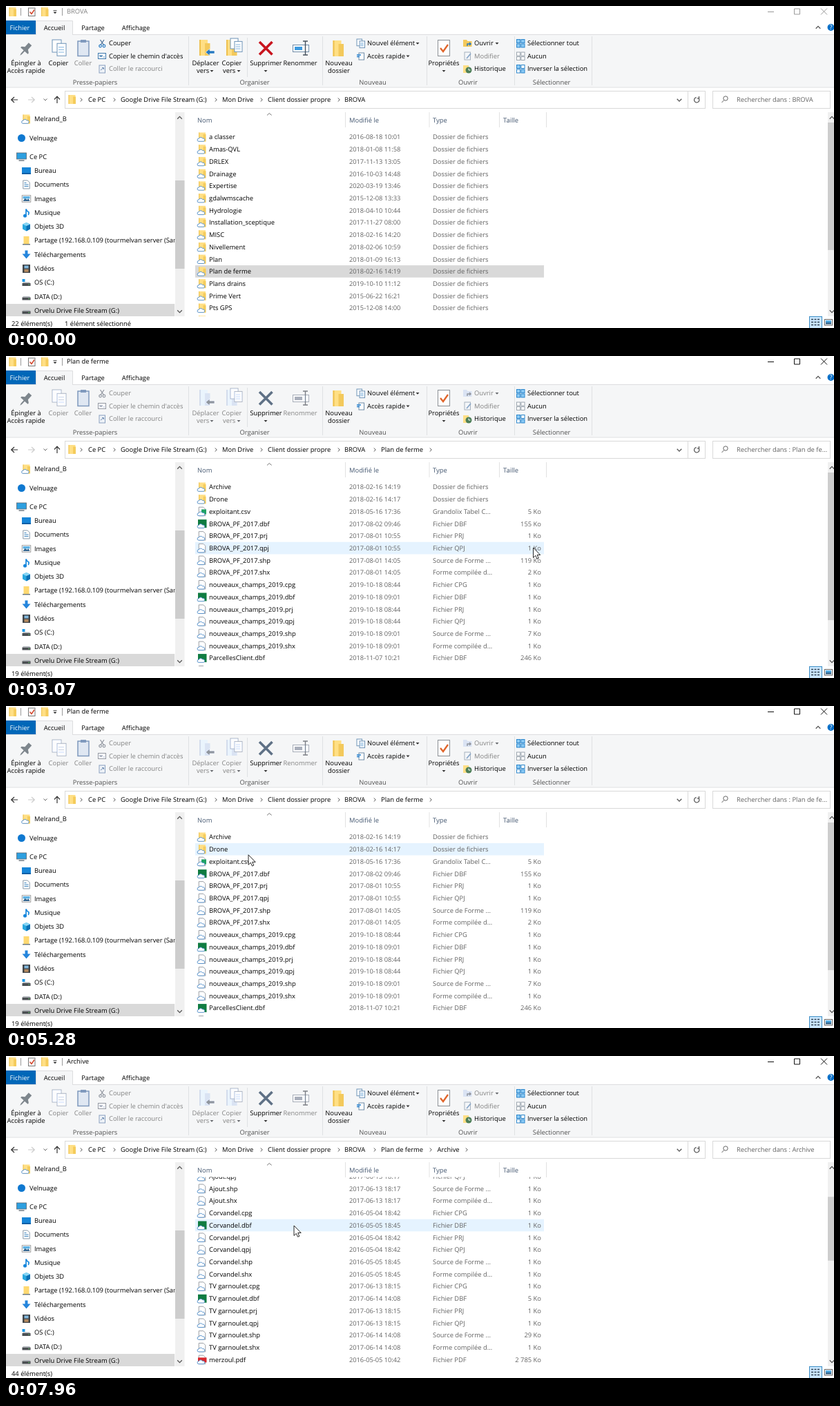
Animation of 1199x467 px, one loop 8 s. Source, as an HTML page:

```html
<!DOCTYPE html>
<html lang="fr">
<head>
<meta charset="utf-8">
<title>Explorateur</title>
<style>
html, body { margin: 0; width: 100%; height: 100%; overflow: hidden; background: #fff; }
svg { display: block; width: 100%; height: 100%; }
text { font: 9.4px "Open Sans", "Noto Sans", sans-serif; fill: #000; text-rendering: geometricPrecision; white-space: pre; }
.m { text-anchor: middle; }
.e { text-anchor: end; }
.off { fill: #838383; }
.soft { fill: #626262; }
.date { font-size: 9.25px; }
.group { fill: #505050; }
.head { fill: #43566f; }
.inv { fill: #fff; }
.dim .on { fill: #838383; }
.dim .ico { filter: grayscale(1) sepia(.4) hue-rotate(180deg) opacity(.75); }
.cross { stroke: #c8141e; }
.dim .cross { stroke: #5f7186; }
.win { stroke: #111; }
.blur .win { stroke: #999; }
.blur #title { fill: #808080; }
</style>
</head>
<body>
<script>
const W = 1199, H = 467, ROW = 17.72, TOP = 181.14, LOOP = 8000;

const text = (x, y, s, c = "", id = "") =>
  `<text x="${x}" y="${y + 3.4}" class="${c}" ${id && `id="${id}"`}>${s}</text>`;
const rect = (x, y, w, h, fill, more = "") =>
  `<rect x="${x}" y="${y}" width="${w}" height="${h}" fill="${fill}" ${more}/>`;
const line = (d, stroke = "#555", w = 1, more = "") =>
  `<path d="${d}" fill="none" stroke="${stroke}" stroke-width="${w}" ${more}/>`;
const fill = (d, color, more = "") => `<path d="${d}" fill="${color}" ${more}/>`;
const disc = (x, y, r, color) => `<circle cx="${x}" cy="${y}" r="${r}" fill="${color}"/>`;
const group = (s, more = "") => `<g ${more}>${s}</g>`;
const use = (id, x, y) => `<use href="#${id}" x="${x}" y="${y}"/>`;
const ico = s => group(s, 'class="ico"');
const drop = (x, y, color = "#333") => fill(`M${x - 2.5} ${y - 1}h5l-2.5 2.8z`, color);
const next = x => line(`M${x - 1.3} 133.5l2.6 2.5l-2.6 2.5`);
const up = (x, y) => line(`M${x - 3.3} ${y + 1.7}l3.3 -3.3l3.3 3.3`, "#555", 1.3);
const down = (x, y) => line(`M${x - 3.3} ${y - 1.7}l3.3 3.3l3.3 -3.3`, "#555", 1.3);

// Icons are centred on 0,0
const page = (w, h, edge = "#8f959b") =>
  fill(`M${-w / 2} ${-h / 2}h${w - 3}l3 3v${h - 3}h${-w}z`, "#fff", `stroke="${edge}" stroke-width=".9"`);
const cloud = fill("M-5 6.3a2 2 0 0 1 .2-4a3 3 0 0 1 5.4-.3a2.2 2.2 0 0 1 1.6 4.3z", "#fff", 'stroke="#4a8ac8" stroke-width=".9"');
const folder = rect(-5, -6.5, 10, 13, "#ffdf85") + rect(1.5, -4, 4, 10.5, "#f5cc5c") + rect(-5, -6.5, 1.2, 13, "#f0c75a");
const icons = {
  folder, dir: folder + cloud,
  file: page(9.5, 12.5) + cloud,
  sheet: rect(-6, -6, 12.5, 12, "#107c41") + cloud,
  csv: page(9.5, 12.5) + rect(-1, -3, 7, 7, "#21a366") + cloud,
  pdf: page(9.5, 12.5) + rect(-6, -3, 12.5, 7, "#d9262c") + cloud,
  pc: rect(-7, -5.5, 14, 9, "#2d9fe0", 'stroke="#5c6670" stroke-width=".8"') + rect(-4, 5, 8, 1.3, "#5c6670"),
  desk: rect(-6.5, -5, 13, 10, "#1685d8") + rect(-6.5, 3, 13, 2, "#0a5ea5"),
  doc: page(9.5, 12, "#7d8fa0") + line("M-3 -2.5h3M-3 0h6M-3 2.5h6", "#3d84bd", 1.2),
  pic: rect(-6.3, -4.8, 12.6, 9.6, "#fff", 'stroke="#888" stroke-width=".8"') + rect(-5, -3.5, 10, 3.5, "#5fb3e6") + fill("M-5 3.5l3-4l3 2l2-1.5l2 3.5z", "#35658e"),
  note: line("M-.5 4.5v-10q1 3 4 4.5q.6 2-.8 4", "#1787dc", 1.7) + disc(-2, 4.3, 2.5, "#1787dc"),
  cube: fill("M-5.5 -3.5L0 -6L5.5 -3.5V3.5L0 6.5L-5.5 3.5z", "#29a8e0") + fill("M0 -1L5.5 -3.5V3.5L0 6.5z", "#0b6fb4") + fill("M-5.5 -3.5L0 -6L5.5 -3.5L0 -1z", "#8ad6f5"),
  share: rect(-4, -6, 8, 11, "#ffd970") + rect(-5.5, 5, 11, 1.5, "#6d7a80"),
  get: fill("M-2 -6h4v5h4L0 6L-6 -1h4z", "#2585dc"),
  film: rect(-5.5, -6, 11, 12, "#3f4347") + rect(-3, -4.5, 6, 4, "#82b8dd") + rect(-3, .8, 6, 4, "#b4895e"),
  disk: rect(-6, 1, 12, 4, "#4b4f53") + rect(-5, -.5, 10, 1.5, "#aeb4b9") + rect(3, 2.5, 1.5, 1, "#61d66b"),
};
icons.system = icons.disk + rect(-6, -5, 4, 4, "#1d9ae8");

const kinds = { csv: "Grandolix Tabel C...", shp: "Source de Forme ...", shx: "Forme compilée d..." };
const looks = { csv: "csv", dbf: "sheet", pdf: "pdf" };

const places = [
  { title: "BROVA", find: "BROVA", count: 22, rows: `a classer|2016-08-18 10:01
Amas-QVL|2018-01-08 11:58
DRLEX|2017-11-13 13:05
Drainage|2016-10-03 14:48
Expertise|2020-03-19 13:46
gdalwmscache|2015-12-08 13:33
Hydrologie|2018-04-10 10:44
Installation_sceptique|2017-11-27 08:00
MISC|2018-02-16 14:20
Nivellement|2018-02-06 10:59
Plan|2018-01-09 16:13
Plan de ferme|2018-02-16 14:19
Plans drains|2019-10-10 11:12
Prime Vert|2015-06-22 16:21
Pts GPS|2015-12-08 14:00
Rapports|2016-05-11 09:30` },
  { title: "Plan de ferme", find: "Plan de fe...", count: 19, rows: `Archive|2018-02-16 14:19
Drone|2018-02-16 14:17
exploitant.csv|2018-05-16 17:36|5
BROVA_PF_2017.dbf|2017-08-02 09:46|155
BROVA_PF_2017.prj|2017-08-01 10:55|1
BROVA_PF_2017.qpj|2017-08-01 10:55|1
BROVA_PF_2017.shp|2017-08-01 14:05|119
BROVA_PF_2017.shx|2017-08-01 14:05|2
nouveaux_champs_2019.cpg|2019-10-18 08:44|1
nouveaux_champs_2019.dbf|2019-10-18 09:01|1
nouveaux_champs_2019.prj|2019-10-18 08:44|1
nouveaux_champs_2019.qpj|2019-10-18 08:44|1
nouveaux_champs_2019.shp|2019-10-18 09:01|7
nouveaux_champs_2019.shx|2019-10-18 09:01|1
ParcellesClient.dbf|2018-11-07 10:21|246
ParcellesClient.prj|2018-11-07 10:21|1
ParcellesClient.shp|2018-11-07 10:21|123
ParcellesClient.shx|2018-11-07 10:21|2
Plan de ferme -Ferme Pré Lunel enr.pdf|2018-05-16 18:03|9 809` },
  { title: "Archive", find: "Archive", count: 44, rows: `Plan2017|2017-08-01 09:44
Vieux plans de ferme|2016-06-10 15:31
Ajout.cpg|2017-06-13 18:17|1
Ajout.dbf|2017-06-13 18:17|1
Ajout.prj|2017-06-13 18:17|1
Ajout.qpj|2017-06-13 18:17|1
Ajout.shp|2017-06-13 18:17|1
Ajout.shx|2017-06-13 18:17|1
Corvandel.cpg|2016-05-04 18:42|1
Corvandel.dbf|2016-05-05 18:45|1
Corvandel.prj|2016-05-04 18:42|1
Corvandel.qpj|2016-05-04 18:42|1
Corvandel.shp|2016-05-05 18:45|1
Corvandel.shx|2016-05-05 18:45|1
TV garnoulet.cpg|2017-06-13 18:15|1
TV garnoulet.dbf|2017-06-14 14:08|5
TV garnoulet.prj|2017-06-13 18:15|1
TV garnoulet.qpj|2017-06-13 18:15|1
TV garnoulet.shp|2017-06-14 14:08|29
TV garnoulet.shx|2017-06-14 14:08|1
merzoul.pdf|2016-05-05 10:42|2 785` },
];

function row(entry, i) {
  const [name, date, size] = entry.split("|"), y = TOP + ROW * (i + .5);
  const ext = size && name.split(".").pop();
  const kind = ext ? kinds[ext] || "Fichier " + ext.toUpperCase() : "Dossier de fichiers";
  return use(ext ? looks[ext] || "file" : "dir", 284, y) + text(294, y, name) +
    text(497, y, date, "soft date") + text(618, y, kind, "soft") +
    (size ? text(775, y, size + " Ko", "e soft") : "");
}

function titleBar() {
  return use("folder", 9.5, 8.5) + line("M21.5 3v11M81.5 3v11", "#999") +
    rect(32.5, 3, 9.5, 11.5, "#fff", 'stroke="#777"') + line("M34.5 8.5l2.5 3l4-6", "#d2452b", 1.5) +
    use("folder", 56, 8.5) + line("M68.5 6.5h5") + drop(71, 9.5) + text(88, 8, "", "", "title") +
    line("M1103 8.5h9M1141.5 4h8v8h-8zM1180 3.5l9 9m0 -9l-9 9", "", 1, 'class="win"') +
    rect(0, 21, 43, 20.5, "#0067b8") + rect(0, 41.5, W, 76, "#f5f6f7") +
    fill("M43.5 42v-20.5h53v20.5", "#f5f6f7", 'stroke="#dcdddf"') +
    line("M0 41.5h43.5M96.5 41.5H1199M0 118H1199", "#dcdddf") +
    text(20, 31.5, "Fichier", "m inv") + text(70, 31.5, "Accueil", "m") +
    text(126, 31.5, "Partage", "m") + text(188, 31.5, "Affichage", "m") +
    up(1176, 31) + disc(1194.5, 31, 5, "#0a70c8") + text(1194.5, 31, "?", "m inv");
}

const sheetPair = (x, y, w, h) => [0, 1].map(i =>
  rect(x + i * w * .35, y + i * h * .22, w * .65, h * .75, "#fff", 'stroke="#6e94b8"')).join("") +
  line(`M${x + w * .45} ${y + h * .45}h${w * .4}m${-w * .4} ${h * .15}h${w * .4}m${-w * .4} ${h * .15}h${w * .4}`, "#82b4de");
const bigFolder = (x, y) => rect(x, y, 12, 23, "#ffdf85") + rect(x + 8, y + 5, 7.5, 18, "#f3c95c") + rect(x, y, 2, 23, "#eec04e");
const tiles = (x, y, color, filled) => [0, 1, 2, 3].map(i =>
  rect(x + (i % 2) * 6.5, y + (i >> 1) * 6.5, 5, 5, filled.includes(i) ? "#8ccbf5" : "#fff", `stroke="${color}"`)).join("");

function ribbon() {
  const tag = (x, s) => text(x, 111, s, "m group");
  return line("M264.5 44v71M458.5 44v71M609.5 44v71M736.5 44v71M848.5 44v71M349.5 46v57", "#dfe1e3") +
    group(fill("M-3 -9h6v8l4 3v2h-6v6l-1 3l-1 -3v-6h-6v-2l4 -3z", "#7e868d"), 'transform="translate(29 62) rotate(42)"') +
    text(29, 82.5, "Épingler à", "m") + text(29, 94, "Accès rapide", "m") +
    ico(sheetPair(67, 49, 20, 24)) + text(76, 82.5, "Copier", "m on") +
    rect(104, 51, 16, 21.5, "#dfe7f2", 'stroke="#7f99bd" stroke-width="1.5"') + rect(108, 49, 8, 4, "#7f99bd") + text(111.5, 82.5, "Coller", "m off") +
    ico(line("M136.5 49l5 7.5M142 49l-5 7.5", "#50749a", 1.3) +
      line("M134.8 58a1.8 1.8 0 1 1 3.6 0a1.8 1.8 0 1 1 -3.6 0M140.2 58a1.8 1.8 0 1 1 3.6 0a1.8 1.8 0 1 1 -3.6 0", "#2f7fc4", 1.2) +
      rect(133.5, 68.5, 11, 8, "#fff", 'stroke="#3c78ad"') + line("M135.5 71l1 3l1 -3l1 3l1 -3M141 74h2", "#2a6ba8", .9)) +
    rect(135, 86, 8.5, 11, "#eef2f7", 'stroke="#8aa0bf"') + line("M137 93l4 -3M139 89.5h2.5v2.5", "#6f8cb3") +
    text(149, 54, "Couper", "on") + text(149, 72.5, "Copier le chemin d'accès", "on") + text(149, 91, "Coller le raccourci", "off") + tag(129, "Presse-papiers") +
    ico(bigFolder(280, 49) + fill("M289 67l6 -5v3h7v4h-7v3z", "#2578c0", 'stroke="#fff" stroke-width=".6"') +
      bigFolder(319, 49) + sheetPair(325, 47, 17, 20) + drop(298, 94) + drop(337, 94)) +
    text(289, 82.5, "Déplacer", "m on") + text(276, 94, "vers", "on") + text(327, 82.5, "Copier", "m on") + text(314, 94, "vers", "on") +
    line("M367 52l18.5 18.5M385.5 52l-18.5 18.5", "", 3.6, 'class="cross"') + text(376.5, 82.5, "Supprimer", "m") + drop(376, 94) +
    ico(rect(415.5, 56.5, 23, 10, "#fff", 'stroke="#6e8ca8"') + rect(418, 59, 11, 5, "#3e9be0") + line("M430 51h7M433.5 51v20M430 71h7", "#46525e", 1.4)) +
    text(426, 82.5, "Renommer", "m on") + tag(360, "Organiser") +
    bigFolder(473.5, 50) + text(482, 82.5, "Nouveau", "m") + text(482, 94, "dossier", "m") +
    sheetPair(508, 48, 11.5, 13) + text(523, 54, "Nouvel élément") + drop(596, 54) +
    rect(511, 68, 7.5, 10, "#fff", 'stroke="#6e8ca8"') + line("M508 71h6M508 73.5h4", "#2380d0", 1.3) + text(523, 72.5, "Accès rapide") + drop(582, 72.5) + tag(531, "Nouveau") +
    rect(625.5, 49.5, 17, 23, "#fff", 'stroke="#8a8f94"') + line("M629 61l4 5l7 -10", "#e0662c", 2.4) + text(634, 82.5, "Propriétés", "m") + drop(634, 94) +
    ico(fill("M662 49h5l1.5 2h6v8h-12.5z", "#f3c95c") + line("M668 58v-3h5m-2 -2l2 2l-2 2", "#2478c0", 1.4) + drop(711, 54)) +
    rect(664, 67, 8.5, 11, "#f4f6f9", 'stroke="#a6b1bd"') + line("M667 76l6 -7", "#89a7c9", 1.8) +
    rect(662, 86, 8, 11, "#ffdf85") + disc(670, 93, 4.5, "#4d7f58") + line("M670 90.5v2.5h2.5", "#fff") +
    text(678, 54, "Ouvrir", "on") + text(678, 72.5, "Modifier", "off") + text(678, 91, "Historique") + tag(669, "Ouvrir") +
    tiles(739.5, 48.5, "#2b86cc", [0, 1, 2, 3]) + tiles(739.5, 67, "#9aa4ad", []) + tiles(739.5, 85.5, "#2b86cc", [0, 3]) +
    text(755, 54, "Sélectionner tout") + text(755, 72.5, "Aucun") + text(755, 91, "Inverser la sélection") + tag(790, "Sélectionner");
}

function addressBar() {
  const crumbs = [[119, "Ce PC"], [166, "Google Drive File Stream (G:)"], [313, "Mon Drive"], [379, "Client dossier propre"], [490, "BROVA"]];
  return line("M17 136H8m4 -4l-4.3 4l4.3 4", "#333", 1.2) + line("M32 136h9m-4 -4l4.3 4l-4.3 4", "#ccc", 1.2) +
    line("M54.5 134.5l2.5 2.5l2.5 -2.5", "#666") + line("M74 141v-9.5m-4 4l4 -4.3l4 4.3", "#333", 1.2) +
    rect(85.5, 123.5, 927, 25, "#fff", 'stroke="#d9d9d9"') + rect(1023.5, 123.5, 170, 25, "#fff", 'stroke="#d9d9d9"') +
    line("M987.5 124v24", "#d9d9d9") + use("folder", 95.5, 135.5) +
    [109, 157, 304, 370, 482].map(next).join("") + crumbs.map(c => text(c[0], 136, c[1])).join("") +
    group(next(534) + text(543, 136, "Plan de ferme"), 'id="crumb1"') + group(next(615) + text(624.5, 136, "Archive"), 'id="crumb2"') +
    group(next(615), 'id="tail1"') + group(next(667), 'id="tail2"') +
    down(975, 136.5) + line("M1003 133.8a3.7 3.7 0 1 1 -3.5 -1.2M1003.5 131v3h-3", "#444", 1.1) +
    line("M1038.8 134a3.2 3.2 0 1 1 6.4 0a3.2 3.2 0 1 1 -6.4 0M1039.7 136.5l-3.2 3.5", "#666") +
    text(1058, 136, "", "soft", "find");
}

function sidebar() {
  const nodes = [["dir", 164, "Melrand_B"], ["desk", 239, "Bureau"], ["doc", 259, "Documents"], ["pic", 279.5, "Images"], ["note", 300, "Musique"],
    ["cube", 320, "Objets 3D"], ["share", 340, "Partage (192.168.0.109 (tourmelvan server (Sam"], ["get", 360.5, "Téléchargements"], ["film", 381, "Vidéos"],
    ["system", 401, "OS (C:)"], ["disk", 421.5, "DATA (D:)"], ["disk", 441.5, "Orvelu Drive File Stream (G:)"]];
  return group(rect(0, 432, 244.5, 18, "#d9d9d9") + nodes.map(n => use(n[0], 29.5, n[1]) + text(41, n[1], n[2])).join("") +
    disc(22.5, 191.5, 5.5, "#0f78d0") + text(34, 191.5, "Velnuage") + use("pc", 22.5, 218.5) + text(34, 218.5, "Ce PC"), 'clip-path="url(#side)"') +
    rect(245, 154, 13.5, 296, "#f0f0f0") + rect(245, 253, 13.5, 128, "#cdcdcd") + up(251.5, 162) + down(251.5, 443);
}

const header = () => line("M491.5 154v22M613 154v22M714.5 154v22M782.5 154v22", "#e2e2e2") +
  line("M378 158.5l3.3 -3l3.3 3", "#777") +
  [[277, "Nom"], [497, "Modifié le"], [618, "Type"], [720, "Taille"]].map(c => text(c[0], 165.5, c[1], "head")).join("");

const statusBar = () => text(8, 460.5, "", "", "count") + text(85, 460.5, "1 élément sélectionné", "", "picked") +
  rect(1163.5, 450.5, 18, 17, "#cce8ff", 'stroke="#3a8cc4"') +
  line("M1166 454.5h3m1.5 0h3m1.5 0h3M1166 458.5h3m1.5 0h3m1.5 0h3M1166 462.5h3m1.5 0h3m1.5 0h3", "#345", 1.3) +
  rect(1185.5, 454.5, 11, 8.5, "#fff", 'stroke="#666"') + rect(1187, 456, 8, 3, "#4fa6dc") + rect(1187, 459, 8, 2.5, "#31628a");

const pointer = group(
  fill("M0 0V14.5L3.3 11.4L5.5 16.3L7.8 15.3L5.7 10.5H10.2Z", "#fff", 'stroke="#111" stroke-width=".9"') +
  group('<circle r="4.7" fill="none" stroke="#1583dc" stroke-width="3"/>' + line("M0 -4.7A4.7 4.7 0 0 1 4.7 0", "#69bdf7", 3), 'id="spin"'), 'id="pointer"');

document.body.insertAdjacentHTML("beforeend", `<svg id="stage" viewBox="0 0 ${W} ${H}"><defs>` +
  Object.entries(icons).map(([id, s]) => group(s, `id="${id}"`)).join("") +
  `<clipPath id="side">${rect(0, 150, 244.5, 300)}</clipPath><clipPath id="view">${rect(262, 175.5, 927, 274.5)}</clipPath></defs>` +
  rect(0, 0, W, H, "#fff") + titleBar() + ribbon() + addressBar() + sidebar() + header() +
  group(rect(274, 0, 505, ROW, "", 'id="sel"') + rect(274, 0, 505, ROW, "#e5f3ff", 'id="hover"') +
    places.map((p, i) => group(p.rows.split("\n").map(row).join(""), `id="list${i}"`)).join(""), 'clip-path="url(#view)"') +
  text(733, 195, "Travail en cours...", "m soft", "wait") +
  group(rect(1190, 154, 9, 296, "#f0f0f0") + rect(1190, 169, 9, 0, "#cdcdcd", 'id="thumb"') + up(1196, 162) + down(1196, 443), 'id="bar"') +
  statusBar() + pointer + "</svg>");

const el = Object.fromEntries([...document.querySelectorAll("[id]")].map(n => [n.id, n]));
const show = (node, on) => { node.style.display = on ? "" : "none"; };
const put = (id, s) => { if (el[id].textContent !== s) el[id].textContent = s; };

// Hard changes of state
const GREY = "#d9d9d9", BLUE = "#cce8ff";
const steps = [
  [0, { place: 0, list: 0, stat: 0, sel: 11, tint: GREY, picked: 1, active: 0, dim: 0, busy: 0, wait: 0, tail: 0 }],
  [1365, { tint: BLUE }],
  [1590, { active: 1 }],
  [2080, { busy: 1 }],
  [2140, { place: 1, list: -1, sel: -1 }],
  [2230, { wait: 1 }],
  [2650, { list: 1, wait: 0, busy: 0, stat: 1, picked: 0 }],
  [2700, { dim: 1 }],
  [2830, { tail: 1 }],
  [5930, { sel: 0, picked: 1, dim: 0 }],
  [6020, { busy: 1 }],
  [6090, { place: 2, list: -1, sel: -1, tail: 0 }],
  [6200, { wait: 1 }],
  [6530, { list: 2, wait: 0, busy: 0, stat: 2, picked: 0 }],
  [6600, { dim: 1 }],
  [6710, { tail: 2 }],
];
// Time, then x, y of the pointer or the scroll offset
const mouse = [[530, 1051, 468], [1320, 634, 397], [1380, 632, 388], [2640, 632, 388], [2860, 757, 293], [3060, 763.5, 278],
  [3130, 763.5, 278], [3300, 743, 277], [4760, 743, 277], [5260, 351, 215.8], [5310, 351, 215.8], [5430, 352, 252], [5590, 356, 194], [6760, 356, 194], [7200, 417, 246]];
const wheel = [[3140, 0], [3340, 52], [3540, 52], [3720, 68.7], [4490, 68.7], [4640, 16.7], [4720, 16.7], [4860, 0],
  [7220, 0], [7420, 52], [7640, 52], [7780, 104]];

function track(keys, t) {
  const i = keys.findIndex(k => k[0] > t);
  if (i < 1) return (i ? keys[keys.length - 1] : keys[0]).slice(1);
  const a = keys[i - 1], b = keys[i], u = (t - a[0]) / (b[0] - a[0]), k = u * (2 - u);
  return a.slice(1).map((v, j) => v + (b[j + 1] - v) * k);
}

function draw(t) {
  const s = Object.assign({}, ...steps.filter(k => k[0] <= t).map(k => k[1]));
  const [x, y] = track(mouse, t), [scroll] = track(wheel, t);
  const place = places[s.place], moved = t >= 530;

  el.stage.setAttribute("class", (s.dim ? "dim " : "") + (s.active ? "" : "blur"));
  put("title", place.title);
  put("find", "Rechercher dans : " + place.find);
  put("count", places[s.stat].count + " élément(s)");
  show(el.picked, s.picked);
  show(el.wait, s.wait);
  show(el.crumb1, s.place > 0);
  show(el.crumb2, s.place > 1);
  show(el.tail1, s.tail === 1);
  show(el.tail2, s.tail === 2);

  places.forEach((p, i) => {
    show(el["list" + i], i === s.list);
    el["list" + i].setAttribute("transform", `translate(0 ${-scroll})`);
  });
  const over = Math.floor((y + scroll - TOP) / ROW);
  const rowY = i => TOP + i * ROW - scroll;
  show(el.sel, s.sel >= 0);
  el.sel.setAttribute("y", rowY(s.sel));
  el.sel.setAttribute("fill", s.tint);
  show(el.hover, moved && s.list >= 0 && x < 779 && y < 450 && over !== s.sel);
  el.hover.setAttribute("y", rowY(over));

  show(el.bar, s.list >= 0);
  const full = place.count * ROW, size = 266 * 271 / full;
  el.thumb.setAttribute("height", size);
  el.thumb.setAttribute("y", 169 + (266 - size) * scroll / (full - 268));

  show(el.pointer, moved);
  el.pointer.setAttribute("transform", `translate(${x} ${y})`);
  show(el.spin, s.busy);
  el.spin.setAttribute("transform", `translate(12 0) rotate(${t * .36})`);
}

const start = performance.now();
(function tick() {
  draw((performance.now() - start) % LOOP);
  requestAnimationFrame(tick);
})();
</script>
</body>
</html>
```
